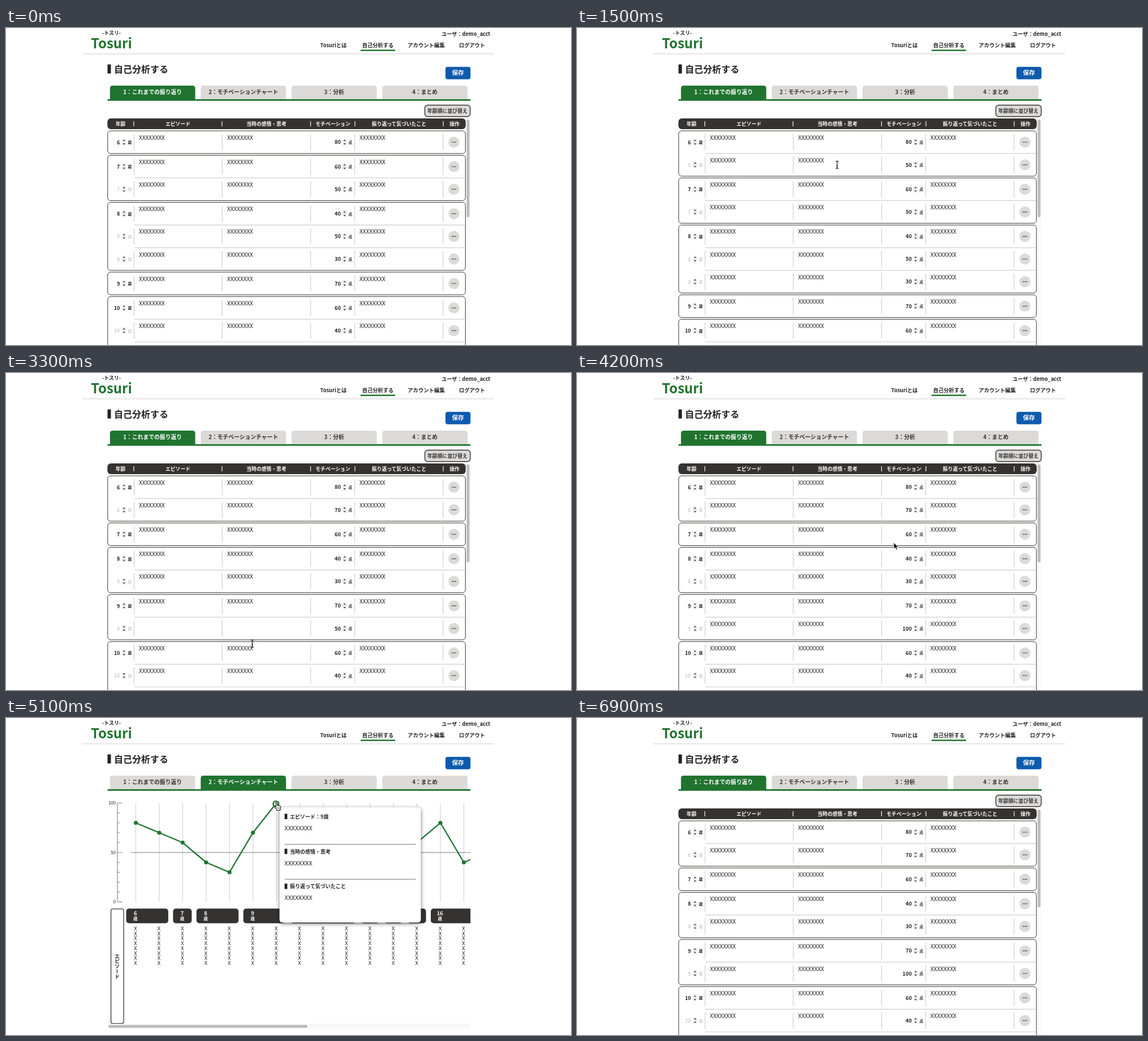
Write an HTML page that moves like this. It is 999 px wide and 561 px high and loops after 7.2 s.

```html
<!DOCTYPE html>
<html lang="ja">
<head>
<meta charset="utf-8">
<title>自己分析する</title>
<style>
  html, body { margin: 0; width: 100%; height: 100%; overflow: hidden; background: #fff; }
  svg { display: block; width: 100%; height: 100%; font-family: "Noto Sans CJK JP", "Noto Sans CJK", sans-serif; }
  .shadow { filter: drop-shadow(0 2px 3px #0009); }
  .vertical { writing-mode: vertical-rl; }
</style>
</head>
<body>
<svg id="stage" viewBox="0 0 999 561"></svg>
<script>
const GREEN = '#20742f', DARK = '#343331', GREY = '#dcdad8', LINE = '#cfcfcf', INK = '#222';
const STEP = 300, STEPS = 24, SAMPLE = 'XXXXXXXX';
const ROW = 40.1, GAP = 3.15, TOP = 182;
const stage = document.getElementById('stage');

// Drawing helpers: text is placed by its vertical centre.
const text = (x, y, s, size, { fill = INK, anchor = 'middle', weight = 700, cls = '' } = {}) =>
  `<text x="${x}" y="${cls ? y : y + size * 0.37}" font-size="${size}" font-weight="${weight}" fill="${fill}" text-anchor="${anchor}" class="${cls}">${s}</text>`;
const rect = (x, y, w, h, fill, r = 0, extra = '') =>
  `<rect x="${x}" y="${y}" width="${w}" height="${h}" rx="${r}" fill="${fill}" ${extra}/>`;
const line = (x1, y1, x2, y2, stroke = LINE, width = 1.2) =>
  `<path d="M${x1} ${y1}L${x2} ${y2}" stroke="${stroke}" stroke-width="${width}"/>`;
const circle = (x, y, r, fill, extra = '') => `<circle cx="${x}" cy="${y}" r="${r}" fill="${fill}" ${extra}/>`;
const sample = (x, y, size = 10) => text(x, y, SAMPLE, size, { anchor: 'start', weight: 400 });
const outline = width => `stroke="${DARK}" stroke-width="${width}"`;

function pageHeader(tab, saving) {
  const start = { anchor: 'start' };
  const tabs = ['1：これまでの振り返り', '2：モチベーションチャート', '3：分析', '4：まとめ'];
  return text(186.5, 9, '-トスリ-', 8.9) +
    text(150, 27, 'Tosuri', 24, { anchor: 'start', fill: GREEN }) +
    text(770, 11, 'ユーザ：demo_acct', 9.2, start) +
    text(579, 31, 'Tosuriとは', 9.3) + text(657.5, 31, '自己分析する', 9.25) +
    text(743, 31, 'アカウント編集', 9.4) + text(824, 31, 'ログアウト', 9.2) +
    rect(627, 38.3, 61, 2.5, GREEN) + rect(135, 44.8, 728, 1.8, '#e2e2e2') +
    rect(179.5, 64.5, 6, 16, INK) + text(191, 73, '自己分析する', 16, start) +
    rect(777, 68.7, 44.3, 22, saving ? '#3c7dc1' : '#0d5bad', 4) + text(799, 79.5, '保存', 10.6, { fill: '#fff' }) +
    tabs.map((label, i) => {
      const x = 183.8 + i * 160.5, active = i === tab;
      return `<path d="M${x} 127v-20q0-5 5-5h140.8q5 0 5 5v20z" fill="${active ? GREEN : GREY}"/>` +
        text(x + 75.4, 113.5, label, 9.8, { fill: active ? '#fff' : DARK });
    }).join('') +
    rect(179.5, 126, 641.8, 2.8, GREEN);
}

// A row is { age, score, cells }, where cells counts the filled text cells.
function rowsAt(step) {
  const rows = [[6, 80], [7, 60, 50], [8, 40, 50, 30], [9, 70], [10, 60, 40, 80], [13, 90], [14, 70], [15, 60], [16, 80, 40, 50]]
    .flatMap(([age, ...scores]) => scores.map(score => ({ age, score, cells: 3 })));
  const fill = (age, elapsed, score) =>
    ({ age, score: elapsed < 2 ? 50 : score, cells: [0, 2, 3][Math.min(elapsed, 2)] });
  const find = (age, score) => rows.findIndex(r => r.age === age && r.score === score);
  if (step >= 8) rows.splice(find(7, 50), 1);
  if (step >= 10) rows.splice(find(8, 50), 1);
  if (step >= 11) rows.splice(find(9, 70) + 1, 0, fill(9, step - 11, 100));
  if (step >= 4) rows.splice(1, 0, fill(6, step - 4, 70));
  return rows;
}

function groupsOf(rows) {
  const groups = [];
  rows.forEach((row, i) => {
    if (i && rows[i - 1].age === row.age) groups.at(-1).count++;
    else groups.push({ age: row.age, first: i, count: 1 });
  });
  return groups;
}

const spinner = (x, y) => rect(x - 4, y - 6, 8, 12, '#efefef', 1) +
  `<path d="M${x - 2.2} ${y - 2}l2.2-2.6l2.2 2.6zM${x - 2.2} ${y + 2}l2.2 2.6l2.2-2.6z" fill="#444"/>`;

function tableRow(row, y, isFirst) {
  const ageInk = { fill: isFirst ? INK : LINE };
  return (isFirst ? '' : line(227, y - ROW / 2, 812, y - ROW / 2)) +
    [226.5, 382.3, 538.6, 616.6, 772.8].map(x => line(x, y - 14.5, x, y + 14.5)).join('') +
    text(201.5, y + 0.3, row.age, 9.2, { ...ageInk, anchor: 'end' }) + spinner(208.7, y) +
    text(218.7, y + 0.5, '歳', 7, ageInk) +
    [235, 391, 625].slice(0, row.cells).map(x => sample(x, y - 8)).join('') +
    text(592, y, row.score, 9.3, { anchor: 'end' }) + spinner(598.7, y) + text(608.7, y + 0.5, '点', 7) +
    circle(792, y, 9.8, GREY) + [-3, 0, 3].map(dx => circle(792 + dx, y, 0.9, INK)).join('');
}

function menu(y, hover) {
  const hoverY = { remove: 12, add: 39 }[hover];
  return rect(689.3, y + 8, 116.7, 54, '#fff', 5, 'class="shadow"') +
    (hover ? rect(697.5, y + hoverY, 100.5, 18.5, GREY, 3) : '') +
    text(747.5, y + 21, 'この行を削除', 8.9) + line(698, y + 34.3, 797.5, y + 34.3, DARK) +
    text(747.5, y + 48, '下に行を追加', 8.9);
}

function table(rows, openMenu) {
  const heads = [[202.5, '年齢'], [304, 'エピソード'], [460.5, '当時の感情・思考'], [578, 'モチベーション'], [695, '振り返って気づいたこと'], [793, '操作']];
  let out = rect(740.5, 136.5, 80.3, 20.3, GREY, 5, outline(1.4)) + text(780.5, 146.5, '年齢順に並び替え', 8.9, { fill: DARK }) +
    rect(179.3, 160, 633.5, 19, DARK, 6) +
    heads.map(([x, label]) => text(x, 169.5, label, 8.8, { fill: '#fff' })).join('') +
    [226, 382, 538.5, 617, 773].map(x => line(x, 165, x, 174, '#fff', 1.2)).join('') +
    rect(813.2, 161, 8, 400, '#fafafa') + rect(814.5, 162, 5, 173, '#bcbcbc', 2.5);
  let y = TOP;
  const centres = [];
  for (const { first, count } of groupsOf(rows)) {
    out += rect(179.8, y, 632.5, count * ROW, '#fff', 5, outline(1));
    for (let i = 0; i < count; i++) {
      centres.push(y + (i + 0.5) * ROW);
      out += tableRow(rows[first + i], centres.at(-1), i === 0);
    }
    y += count * ROW + GAP;
  }
  return out + (openMenu ? menu(centres[openMenu.row], openMenu.hover) : '');
}

const pointX = i => 229.5 + 41.43 * i;
const pointY = score => 325.5 - 1.75 * score;

function popup(row, i) {
  const x = pointX(i) + 5.5, y = pointY(row.score) + 7.5;
  const titles = [`エピソード：${row.age}歳`, '当時の感情・思考', '振り返って気づいたこと'];
  return circle(pointX(i) - 0.8, pointY(row.score) + 1.5, 4.8, '#fff', `stroke="${GREEN}" stroke-width="2.6"`) +
    rect(x, y, 250, 204, '#fff', 5, 'class="shadow"') +
    titles.map((title, k) => {
      const ty = y + 16.5 + k * 61.8;
      return rect(x + 9, ty - 5, 4.8, 9.5, INK) + text(x + 18.5, ty, title, 9, { anchor: 'start' }) +
        sample(x + 9, ty + 20.3, 10.7) + (k < 2 ? line(x + 9, ty + 49, x + 241, ty + 49, '#777', 1) : '');
    }).join('');
}

function chart(rows, selected) {
  let out = line(197, 150.5, 197, 325.5, '#888');
  for (let v = 0; v <= 100; v += 10) {
    const major = v % 50 === 0;
    out += line(197, pointY(v), major ? 205.5 : 201, pointY(v), '#888');
    if (major) out += text(194, pointY(v), v, 7.8, { anchor: 'end', weight: 500 });
  }
  rows.forEach((row, i) => {
    out += line(pointX(i), 150.5, pointX(i), 325.5, '#d4d4d4');
    for (let k = 0; k < SAMPLE.length; k++) out += text(pointX(i) - 0.5, 372.5 + 8.73 * k, SAMPLE[k], 9.3, { weight: 400 });
  });
  out += line(221, 238, 822, 238, '#777');
  const points = rows.map((row, i) => `${pointX(i)},${pointY(row.score)}`).join(' ');
  out += `<polyline points="${points}" fill="none" stroke="${GREEN}" stroke-width="2.3"/>`;
  rows.forEach((row, i) => out += circle(pointX(i), pointY(row.score), 3.6, GREEN));
  for (const { age, first, count } of groupsOf(rows)) {
    const x = pointX(first);
    out += rect(x - 17, 337.3, (count - 1) * 41.43 + 33, 26, DARK, 5) +
      text(x - 0.7, 345, age, 9.5, { fill: '#fff' }) + text(x - 0.7, 355.5, '歳', 7.6, { fill: '#fff' });
  }
  out += rect(185.6, 337.8, 22.4, 202.8, '#fff', 3, outline(1.3)) +
    text(196.5, 439.5, 'エピソード', 9, { cls: 'vertical' }) +
    rect(179.5, 541, 642, 9, '#f8f8f8') + rect(181, 543.2, 352, 5, '#bcbcbc', 2.5);
  if (selected !== undefined) out += popup(rows[selected], selected);
  return `<clipPath id="view"><rect x="179" y="130" width="642.2" height="431"/></clipPath><g clip-path="url(#view)">${out}</g>`;
}

const pointers = {
  arrow: '<path d="M0 0v11.5l2.7-2.5l1.9 4.2l2-.9l-1.8-4.1h3.6z" fill="#111" stroke="#fff" stroke-width=".9"/>',
  hand: '<path d="M-1.2 1q0-1.3 1.1-1.3t1.3 1.3l.4 3.6q1.3-.6 1.9.4q1.4-.5 2 .6q2-.3 2.2 1.6q.2 3-1 4.6v1.7h-5.600q-.5-1.800-3-4.300q-1.900-2-.9-2.700t2.300 1z" fill="#fff" stroke="#111" stroke-width="1.1"/><path d="M2.200 8v3M4 8v3M5.700 8v3" stroke="#111" stroke-width=".6"/>',
  beam: '<path d="M-2.800-6.500q2.800 0 2.800 1.500q0-1.500 2.800-1.500M0-5V5M-2.800 6.500q2.800 0 2.800-1.500q0 1.500 2.800 1.500M-1.500 2h3" fill="none" stroke="#111" stroke-width="1.200"/>'
};

// What the user does at each step; steps left out have no pointer.
const script = {
  1: { pointer: ['hand', 793, 203] },
  2: { pointer: ['hand', 793, 203], menu: { row: 0 } },
  3: { pointer: ['hand', 771, 257], menu: { row: 0, hover: 'add' } },
  4: { pointer: ['beam', 310, 242] },
  5: { pointer: ['beam', 460, 242] },
  6: { pointer: ['beam', 690, 242] },
  7: { pointer: ['hand', 771, 347], menu: { row: 3, hover: 'remove' } },
  8: { pointer: ['beam', 771.5, 352.5] },
  9: { pointer: ['hand', 771, 389], menu: { row: 4, hover: 'remove' } },
  10: { pointer: ['hand', 771, 466], menu: { row: 5, hover: 'add' } },
  11: { pointer: ['beam', 435.5, 479] },
  12: { pointer: ['beam', 460, 454] },
  13: { pointer: ['beam', 690, 454] },
  14: { pointer: ['arrow', 560, 300] },
  15: { pointer: ['hand', 453, 123] },
  16: { pointer: ['arrow', 470, 180] },
  17: { pointer: ['hand', 478, 150], selected: 6 },
  18: { pointer: ['hand', 602, 186], selected: 9 },
  19: { pointer: ['arrow', 640, 165], selected: 9 },
  20: { pointer: ['arrow', 805.5, 83.500], selected: 9, saving: true }
};

function draw(step) {
  const { pointer, menu: openMenu, selected, saving } = script[step] || {};
  const rows = rowsAt(step), showChart = step >= 15 && step <= 20;
  let out = pageHeader(showChart ? 1 : 0, saving) + (showChart ? chart(rows, selected) : table(rows, openMenu));
  if (pointer) {
    const [kind, x, y] = pointer;
    out += `<g transform="translate(${x} ${y})">${pointers[kind]}</g>`;
  }
  stage.innerHTML = out;
}

let shown = -1;
function tick() {
  const step = Math.floor(performance.now() / STEP) % STEPS;
  if (step !== shown) draw(shown = step);
  requestAnimationFrame(tick);
}
tick();
</script>
</body>
</html>
```
